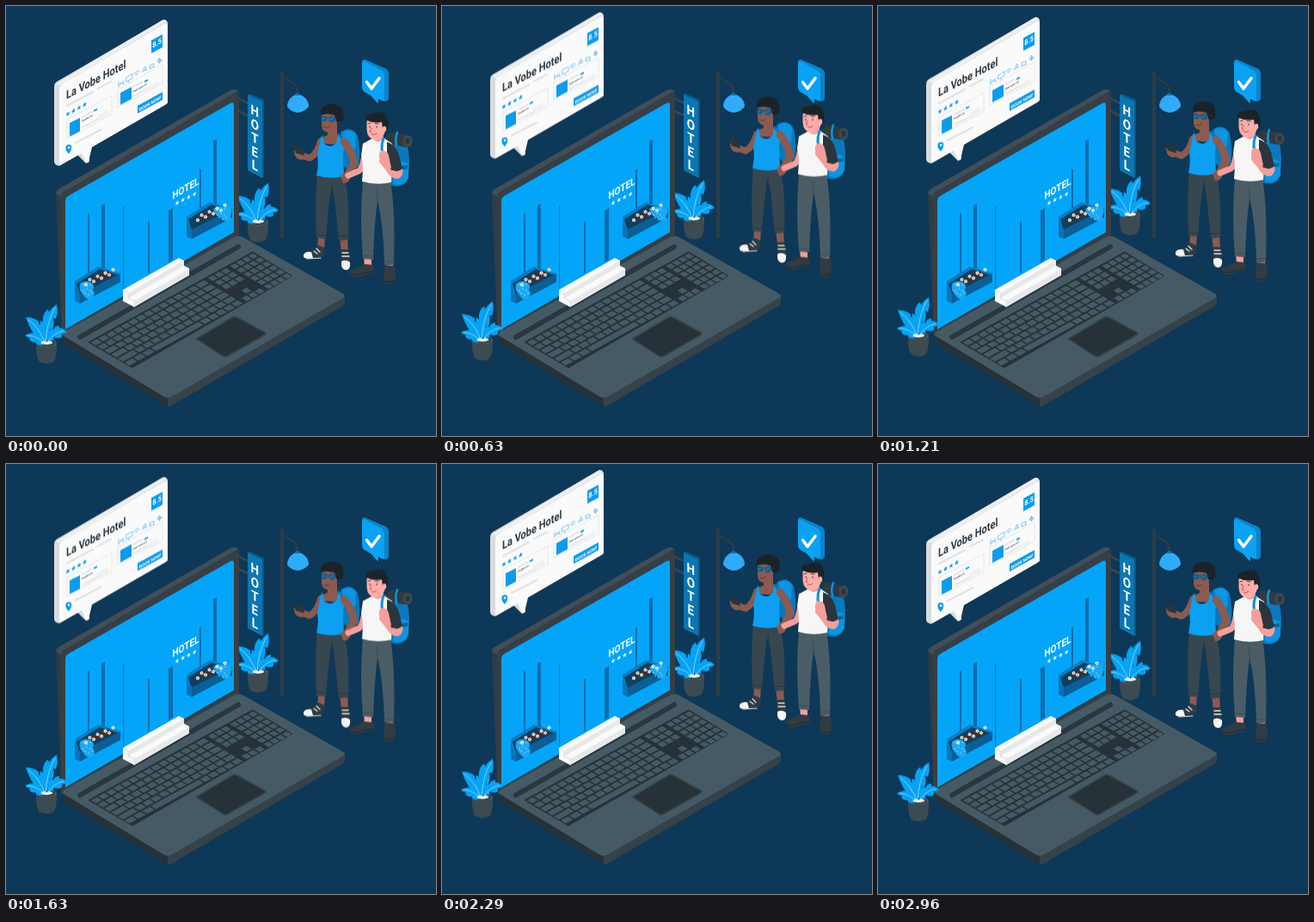
An HTML page that plays this animation: 500 by 500 pixels, repeating every 3 s.

```html
<!DOCTYPE html>
<html lang="en">
<head>
<meta charset="utf-8">
<title>Hotel booking</title>
<style>
html,body{margin:0;width:100%;height:100%;overflow:hidden;background:#0e3857}
svg{display:block;width:100vw;height:100vh}
text{font-family:Roboto,"Open Sans",sans-serif;font-weight:700}
.fast,.slow{animation:bob 1.5s cubic-bezier(.37,0,.63,1) infinite}
.slow{animation-duration:3s}
@keyframes bob{50%{transform:translateY(-9px)}}
.line{fill:none;stroke-linecap:round;stroke-linejoin:round}
</style>
</head>
<body>
<svg viewBox="0 0 500 500">
<defs>
  <path id="star" d="M0-1 .24-.33 .95-.31 .38.12 .59.81 0 .4-.59.81-.38.12-.95-.31-.24-.33z"/>
  <g id="plant">
    <path fill="#3c4a52" d="M-12-24C-12.500-10-10-4-8-2Q0 2 8-2C10-4 12.500-10 12-24z"/>
    <ellipse cy="-24" rx="12" ry="4.500" fill="#455a64"/>
    <ellipse cy="-24" rx="9.500" ry="3.200" fill="#263238"/>
    <g fill="#05a3f6">
      <path d="M-3-24C-12-29-19-39-24-54Q-15-54-9-49L-9-46Q-3-43-2-36L-4-35Q0-31-1-24z"/>
      <path d="M1-24Q0-36 6-41L8-39Q10-44 15-44L15-41Q19-42 24-37Q21-34 18-35L18-31Q13-28 9-31L8-27Q4-27 1-24z"/>
      <path d="M-1-25C-6-34-9-42-7-50L-4-48C-5-56-1-62 2-63L3-60Q7-66 12-69Q14-60 11-52L8-53Q10-44 6-39L4-41Q4-32-1-25z"/>
      <path d="M-2-23Q-7-20-12-23L-12-25Q-17-24-20-28L-19-30Q-23-30-25-33Q-17-37-11-35Q-4-32-2-23z"/>
    </g>
    <path class="line" stroke="#d8effd" stroke-width=".6" d="M-1-23Q0-48 10-65M-2-24Q-8-42-21-51M1-24Q8-36 20-38M-3-24Q-10-32-22-33"/>
    <path fill="#f3f9fd" d="M-7-24Q-3-28 0-25 4-28 8-24 0-20-7-24z"/>
  </g>
  <g id="box">
    <path fill="#0a7cc2" d="M80 320 107 303 133 311 133 316 86 341 80 338z"/>
    <path fill="#10405f" d="M82 323 109 306 131 313 86 336z"/>
    <path fill="#0973b5" d="M80 326 86 334V346L80 343z"/>
    <path fill="#0b5f96" d="M86 335 133 311V321L86 346z"/>
    <path fill="#3a2f35" d="M93 325 96 319 118 308 127 313z"/>
  </g>
</defs>

<!-- lamp -->
<path fill="#2c3d47" d="M319 76Q321 74 323 76V270H319z"/>
<path class="line" stroke="#2c3d47" stroke-width="2.500" d="M321 82 334 90Q339 93 339 102"/>
<path fill="#2fabfa" d="M327 117C327 109 333 104 339 102 346 104 352 109 352 117Q346 124 339 124 331 123 327 117z"/>
<path fill="#0877b8" d="M335.500 104Q336 101 339 101 342 102 342.500 104z"/>

<!-- hanging sign -->
<path class="line" stroke="#37474f" stroke-width="2.500" d="M270 107 283 114M270 122 283 128"/>
<path fill="#07588a" d="M281 103 284 102 300 109V199L298 200z"/>
<path fill="#0a76b2" d="M281 103 298 111V200L281 191z"/>
<g id="sign" fill="#fff" font-size="15.500" text-anchor="middle"></g>

<use class="slow" href="#plant" x="293" y="274.700"/>

<!-- laptop lid -->
<path fill="#303c44" d="M58 218Q58 215 61 213L261 98Q268 95 271 101V268L66 385 64 376z"/>
<path fill="#414e57" d="M58 218Q58 215 61 213L261 98Q267 95 270 99L66 217 64 222z"/>
<path fill="#353f47" d="M64 224Q64 220 67 218L265 103Q271 101 271 107V268L66 385 64 380z"/>
<path fill="#04a5f8" d="M69 226Q69 223 72 221L261 113Q265 111 265 115V263L69 376z"/>

<!-- facade -->
<g fill="#0a6cad">
  <path d="M95 241h2v70l-2 1zM111 232 115 230V305l-4 2zM165 250h2v60l-2 1zM189 238 194 235V295l-5 3zM225 190h2v52l-2 1zM241 157 245 155V231l-4 2z"/>
  <path opacity=".7" d="M136 232h1.200v98h-1.200z"/>
</g>
<text transform="matrix(.84 -.485 0 1 193.500 225)" fill="#fff" font-size="12">HOTEL</text>
<g id="screenStars" fill="#fff"></g>

<use href="#box"/>
<path fill="#18a9f5" d="M86 323Q91 318 98 321 104 324 101 330 105 335 100 340 94 343 90 336 84 331 86 323z"/>
<use href="#box" x="130" y="-75"/>
<path fill="#18a9f5" d="M241 236Q247 231 253 234 261 232 263 239 260 243 261 249 254 252 250 246 243 244 241 236z"/>
<g id="flowers"></g>

<!-- laptop base -->
<path fill="#263238" d="M66 380 188 453V466L70 394Q66 391 66 386z"/>
<path fill="#35424a" d="M188 453 394 335V344Q394 347 391 349L192 465Q190 466 188 466z"/>
<path fill="#455a64" d="M66 383Q65 381 69 378L265 269Q271 266 276 269L391 334Q396 337 391 340L193 454Q188 457 183 454z"/>
<path class="line" stroke="#2a373f" stroke-width="6" d="M86 385 270 280"/>
<path fill="#263238" stroke="#37474f" stroke-width="1.500" d="M221 387 264 361.500Q266 360.500 268 361.500L301 379.500Q303 381 301 382.500L258 407Q255 409 252 407z"/>
<path fill="#263238" stroke="#263238" stroke-width="2" stroke-linejoin="round" d="M97 391 287 286.500 332 314 147 420z"/>
<g id="keys" fill="#465a64" transform="matrix(190 -104.500 47 28 97 391)"></g>

<!-- entrance steps -->
<path fill="#fafafa" d="M136 330 201 293 207 296V302L213 305V313L149 350 136 343z"/>
<path fill="#e6e8e9" d="M142 334 207 296V302L142 340zM149 343 213 306V313L149 350z"/>
<path class="line" stroke="#cfd3d6" stroke-width=".7" d="M136 330 142 334V340L149 343V350"/>

<use class="slow" href="#plant" x="47" y="415.700"/>

<!-- review card -->
<g class="fast">
  <path fill="#d9dbdc" d="M56 94Q56 90 59 88L181 17Q185 14 188 19V113L62 186Q56 185 56 181z"/>
  <path fill="#efefef" d="M57 91 181 17Q185 15 187 18L63 92z"/>
  <path fill="#d9dbdc" d="M83 173 93 183 97 181 96 166z"/>
  <path fill="#fafafa" d="M62 97Q62 93 65 91L184 21Q188 19 188 23V110Q188 113 185 115L100 164 96 181Q95 183 93 182L88 171 65 184Q62 186 62 182z"/>
  <text transform="matrix(.8 -.42 0 1 70 108.500)" fill="#2b3a45" font-size="13.800">La Vobe Hotel</text>
  <g fill="#0d9bec">
    <path d="M169 40 182 33V48L169 55z"/>
    <path d="M74 136 86 130V146L74 152zM133 101 146 94V108L133 115z"/>
    <path d="M153 116 182 100V109L153 125z"/>
    <path d="M102 121 106 119V121L102 123zM161 87 165 85V87L161 89z"/>
    <path fill-rule="evenodd" d="M73 172Q69 168 69.500 165.500A3.400 3.600 0 0 1 76.300 164Q76.500 168 73 172zM73 163.200a1.400 1.400 0 1 0 .1 0z"/>
  </g>
  <text transform="matrix(.866 -.5 0 1 170.300 49)" fill="#fff" font-size="8.500">8.5</text>
  <text transform="matrix(.866 -.5 0 1 155 122.500)" fill="#fff" font-size="5.400">BOOK NOW!</text>
  <g class="line" stroke="#e1e3e5" stroke-width=".8">
    <path d="M71 132 123 104V126L71 154zM130 97 182 68V90L130 118z"/>
    <path stroke-width="2.500" d="M71 116 101 100M107 96 122 88M81 159 110 144"/>
    <path stroke-width="1.500" d="M89 129 100 123M89 141 116 127M148 94 159 88M148 105 176 90"/>
    <path stroke-width="6" stroke="#eff0f1" stroke-linecap="butt" d="M107 130 119 123M166 97 178 90"/>
  </g>
  <g fill="#37474f" font-size="3">
    <text transform="matrix(.866 -.5 0 1 88.500 135)">Double (2)</text>
    <text transform="matrix(.866 -.5 0 1 147.500 101)">Twin room (2)</text>
  </g>
  <g id="cardStars" fill="#0d9bec"></g>
  <g class="line" stroke="#4fb5f3" stroke-width=".7">
    <path d="M131 88V94M131 92 137 89V91M133 90 137 87"/>
    <path d="M140 83 147 79V84L140 88zM143 87V89"/>
    <path d="M149 79Q152 74 155 76M150.500 80Q152 77 154 78M152 80v.5"/>
    <path d="M158 77 161 75 164 74M160 73 162 70 163 73M159 75 162 73"/>
    <path d="M167 72V69L172 67V70zM168 73v.5M172 71v.5"/>
    <circle cx="178.500" cy="63.500" r="2"/><path d="M178.500 60.500V66.500M176 65 181 62"/>
  </g>
</g>

<!-- check bubble -->
<path fill="#0b83c9" d="M414 65Q414 62 417 62L442 73Q445 75 445 78V107Q445 110 441 111L437 110z"/>
<path fill="#0aa2f4" d="M414 67Q414 63 418 65L437 75Q440 77 440 80V108Q440 111 437 110L433 108 432.500 113.500 424 104 417 100Q414 98 414 95z"/>
<path class="line" stroke="#fff" stroke-width="3.500" d="M419.500 88.500 425 96 434 84"/>

<!-- travellers -->
<g class="fast">
  <!-- woman -->
  <path fill="#0a78bd" d="M389 147Q401 138 409 151 413 170 410 187L398 192 390 182z"/>
  <path fill="#0b95e2" d="M391 147Q401 141 407 150L406 166 394 168z"/>
  <g fill="#1b2329">
    <ellipse cx="379" cy="122.500" rx="13" ry="8.500"/>
    <circle cx="387" cy="129" r="6"/>
  </g>
  <path fill="#8b5b50" d="M374 142 385 138V149L392 153 387 161 368 160 365 154 374 150z"/>
  <path fill="#8b5b50" d="M367 126Q374 121 384 127L385 136Q383 147 375 147 368 147 367 139z"/>
  <path fill="#1b2329" d="M366 127Q367 119 377 118 388 120 387 135L384 134 382 127Q373 124 366 127z"/>
  <path class="line" stroke="#163b56" stroke-width=".8" d="M366 130 386 130"/>
  <circle cx="370" cy="131" r="3.500" fill="#175d8b"/><circle cx="379" cy="131.500" r="3.800" fill="#175d8b"/>
  <path class="line" stroke="#2198da" d="M368 132l2-2M377 133l3-3"/>
  <path class="line" stroke="#5a302d" stroke-width=".8" d="M370 141Q373 143 376 140.500"/>
  <path class="line" stroke="#8b5b50" stroke-width="7.500" d="M366 157Q362 172 353 177L342 173"/>
  <path fill="#8b5b50" d="M335 170Q334 167 338 167L346 171 345 179Q336 179 335 170z"/>
  <path fill="#29343b" d="M334 163Q334 161 337 162L345 166 347 174 337 171z"/>
  <path fill="#8b5b50" d="M363 268H371L370 283 362 282zM388 268H397L398 287H390z"/>
  <path fill="#2f3c43" d="M363 278 370 281Q372 290 366 292 355 296 348 293 345 290 349 286 358 286 363 278z"/>
  <path fill="#f5f5f5" d="M346 289Q349 285 355 286L357 293Q348 295 346 292z"/>
  <path class="line" stroke="#dde3e6" stroke-width="1.200" d="M358 285 362 288M361 282 365 286M350 294 366 293"/>
  <path fill="#2f3c43" d="M389 283 398 283Q401 296 400 302 396 308 390 304z"/>
  <path fill="#f5f5f5" d="M390 297Q395 294 400 298 401 307 395 307 389 306 390 297z"/>
  <path class="line" stroke="#dde3e6" stroke-width="1.300" d="M391 287H398M391 291H399"/>
  <path fill="#37474f" d="M362 194 392 196Q400 216 398 272L387 273 382 225 378 210Q374 240 372 271L361 270Q359 224 362 194z"/>
  <path class="line" stroke="#29363d" stroke-width="1" d="M379 207 382 228M361 266 372 267M387 268 398 267"/>
  <path fill="#0d9ff1" d="M366 153 368 150 370 160Q378 167 385 158L386 148 390 151 394 160 392 172 393 198Q376 202 361 197 364 184 362 174z"/>
  <path class="line" stroke="#0877b8" stroke-width="3" d="M387 150Q398 160 394 185"/>
  <path class="line" stroke="#8b5b50" stroke-width="9" d="M393 158Q401 167 405 182 401 192 396 198"/>
  <path fill="#8b5b50" d="M389 198Q391 194 398 194L401 199Q398 207 392 206z"/>

  <!-- man -->
  <path fill="#0a78bd" d="M440 154Q456 150 466 160 472 180 466 204 458 213 446 208z"/>
  <path fill="#0b95e2" d="M449 183Q460 178 468 184L468 200Q460 212 450 206z"/>
  <path fill="#08639b" d="M450 188 467 185V189L451 193z"/>
  <path class="line" stroke="#2f3a41" stroke-width="14" d="M449 154 465 157"/>
  <ellipse cx="467" cy="157" rx="5.500" ry="7" fill="#3d4a52"/>
  <ellipse cx="467" cy="157" rx="2.500" ry="3.500" fill="#29343b"/>
  <path class="line" stroke="#0b95e2" stroke-width="2.500" d="M455 147Q452 154 454 162"/>
  <path class="line" stroke="#f59f9c" stroke-width="7" d="M416 178Q414 190 410 192L398 197"/>
  <path fill="#f59f9c" d="M416 288H425V305H417zM441 290H450V309H441z"/>
  <path fill="#303c43" d="M416 300 426 301Q430 307 427 311 418 311 411 315 402 316 399 311 399 306 407 305z"/>
  <path fill="#303c43" d="M440 301 452 302Q454 314 452 321 446 327 439 321 438 315 440 308z"/>
  <path class="line" stroke="#1f292f" d="M400 312Q410 314 416 310L427 309M440 320Q446 323 452 319"/>
  <path fill="#4a5d67" d="M415 203 447 203Q453 240 451 301L440 301Q439 256 432 225 428 256 427 295L415 294Q411 246 415 203z"/>
  <path class="line" stroke="#3a4a53" d="M431 213 433 232M415 290 427 291M440 297 451 297"/>
  <path fill="#f6f6f6" d="M415 160 426 154 440 154 449 160Q450 182 448 205 431 209 414 204 416 184 413 174z"/>
  <path fill="#f59f9c" d="M427 145 438 143 439 154Q433 161 427 155z"/>
  <path fill="#ffada9" d="M419.500 134Q425 127 438 131L441 145Q439 155 429 156 420 154 419.500 144z"/>
  <path fill="#1b2329" d="M418 132Q417 125 427 125 439 120 443 130 447 140 442 147L438 143 437 135Q427 137 418 132z"/>
  <ellipse cx="440" cy="143" rx="2.300" ry="3.200" fill="#ffada9"/>
  <path class="line" stroke="#263238" stroke-width="1.200" d="M423 140v1M431 140v1"/>
  <path class="line" stroke="#263238" stroke-width=".8" d="M421 137l3-1M429 136.500l4 .5"/>
  <path class="line" stroke="#b84f56" stroke-width=".9" d="M425 142l-2 4 2 .5M425 149Q428 151 431 148"/>
  <path class="line" stroke="#0b8fda" stroke-width="3" d="M439 154Q434 166 441 180"/>
  <path class="line" stroke="#f59f9c" stroke-width="8" d="M456 190Q456 197 450 195L438 180"/>
  <path fill="#2a353c" d="M443 158Q453 161 457 173L461 190Q455 196 448 191L443 174z"/>
  <path fill="#f59f9c" d="M434 177Q433 170 437 168 444 168 445 174L448 188 443 190z"/>
  <path fill="#f59f9c" d="M450 191Q456 194 461 189 463 197 456 201 448 201 443 193z"/>
</g>
</svg>
<script>
const NS = "http://www.w3.org/2000/svg";
const add = (id, tag, attrs, text = "") => {
  const el = document.createElementNS(NS, tag);
  for (const k in attrs) el.setAttribute(k, attrs[k]);
  el.textContent = text;
  document.getElementById(id).append(el);
};
const dot = (x, y, r, fill) => add("flowers", "circle", {cx: x, cy: y, r, fill});
const star = (id, x, y, r) => add(id, "use", {href: "#star", transform: `matrix(${r * .9} ${-r * .5} 0 ${r} ${x} ${y})`});

[..."HOTEL"].forEach((c, i) =>
  add("sign", "text", {transform: `matrix(.866 .45 0 1 289.300 ${127.5 + i * 15.8})`}, c));

for (let i = 0; i < 4; i++) {
  star("screenStars", 199 + i * 6.7, 229 - i * 3.4, 2.9);
  star("cardStars", 72 + i * 6.5, 125.5 - i * 3.6, 3.1);
}

// blossoms in both planters, speckles on the trailing leaves
for (const [ox, oy] of [[0, 0], [130, -75]]) {
  for (let i = 0; i < 8; i++) {
    const x = ox + 93 + i * 4.5, y = oy + 324 - i * 1.9 - (i % 2) * 4;
    for (let k = 0; k < 5; k++)
      dot(x + 1.3 * Math.cos(k * 1.257), y + 1.3 * Math.sin(k * 1.257), .9, "#f5f1ed");
    dot(x, y, .6, "#d58a6c");
  }
}
for (const [ox, oy] of [[90, 324], [246, 236]])
  for (let i = 0; i < 9; i++)
    dot(ox + (i % 3) * 4 + (i > 5 ? 2 : 0), oy + Math.floor(i / 3) * 5 + (i % 2) * 2, .7, "#b9e4ff");

// keyboard: unit square, six rows
const key = (x, row, w) =>
  add("keys", "rect", {x: x + .004, y: row / 6 + .02, width: w - .008, height: 1 / 6 - .04, rx: .004});
const fill = (from, to, n, row) => {
  const w = (to - from) / n;
  for (let i = 0; i < n; i++) key(from + i * w, row, w);
};
for (let r = 0; r < 5; r++) {
  const lead = [.045, .045, .065, .08, .1][r];
  key(0, r, lead);
  fill(lead, .64, 13 - Math.floor(r / 2), r);
  key(.64, r, .06);
}
fill(0, .16, 3, 5);
key(.16, 5, .3);
fill(.46, .7, 5, 5);
for (const r of [0, 1, 2]) fill(.715, .835, 3, r);
key(.755, 4, .04);
fill(.715, .835, 3, 5);
for (let r = 0; r < 6; r++) fill(.85, 1, 4, r);
</script>
</body>
</html>
```
